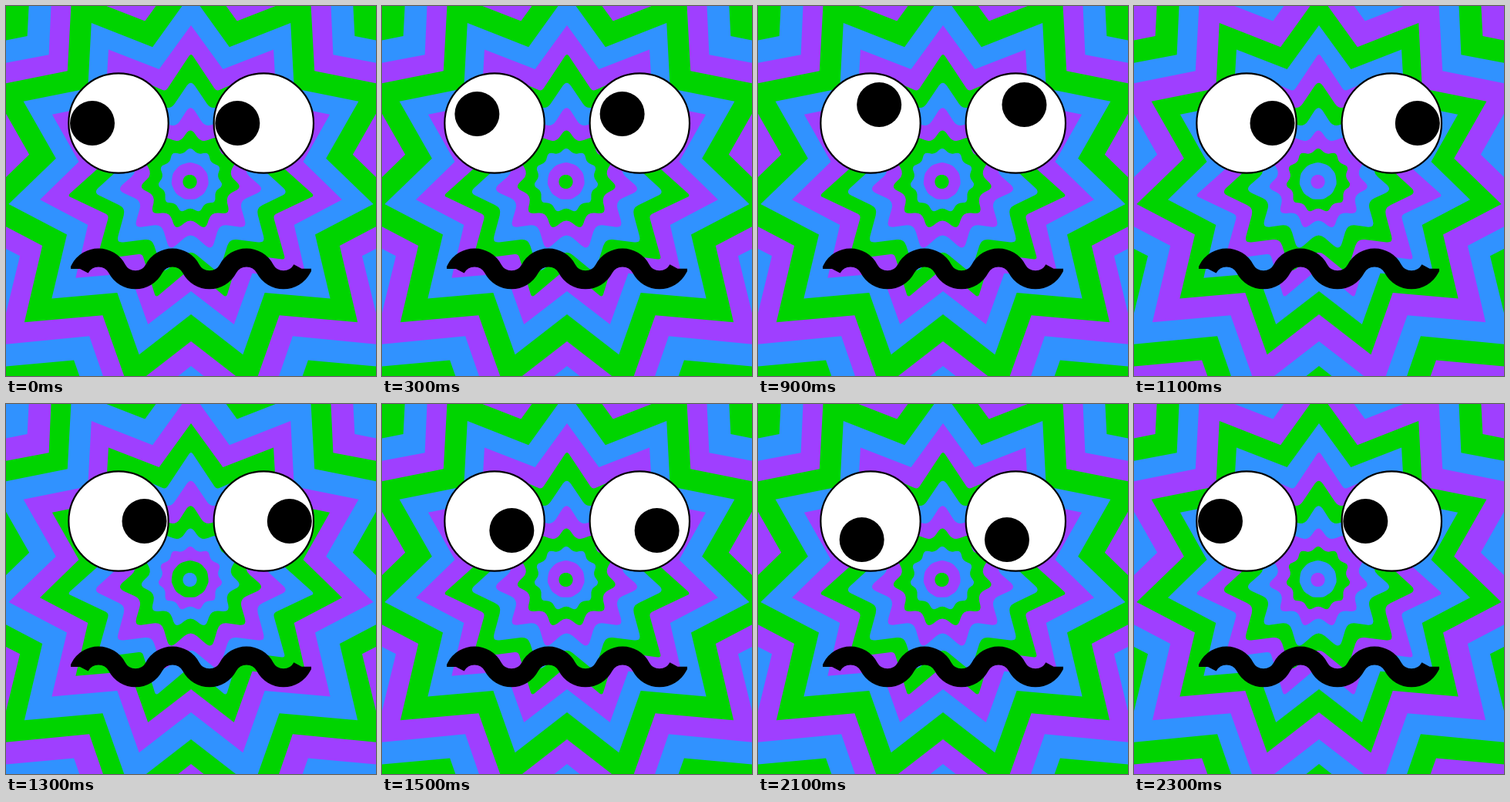
An HTML page with a canvas for the animation above (2.4 s loop, 480 by 480 pixels).

```html
<!DOCTYPE html>
<html lang="en">
<head>
<meta charset="utf-8">
<title>Dizzy face</title>
<style>
  html, body { margin: 0; width: 100%; height: 100%; overflow: hidden; }
  canvas { display: block; }
</style>
</head>
<body>
<canvas id="stage" width="480" height="480"></canvas>
<script>
const ctx = document.getElementById('stage').getContext('2d');
const STEP = 100, STEPS = 24, POINTS = 11;
const COLORS = ['#00d400', '#9f3fff', '#3092ff'];

// Each ring: tip radius, notch radius, corner rounding (0.5 = fully smooth)
const RINGS = [
  [9.2, 9.2, .5], [24.6, 23.6, .5], [44.3, 34.5, .5], [68, 50, .4],
  [97, 69.4, .3], [128, 93, .2], [162, 117, .08], [198, 147, 0],
  [239, 177, 0], [286, 212, 0], [331, 244, 0], [380, 281, 0]
].map(star);

const ARCS = [1, 0, 1, 0, 1, 0].map(sweep => `a27.2 27.2 0 0 ${sweep} 48 0`).join('');
const MOUTH = new Path2D(`M96 341v-.1${ARCS}v-.1`);

// Pupil stops, relative to the eye centre: left, top, right, bottom
const STOPS = [[-34, 0], [0, -36], [33.5, 0], [0, 36]];

function star([tip, notch, round], k) {
  const cx = Math.min(240, 238.5 + k * .25);
  const cy = Math.max(223, 228 - k * .85);
  const count = POINTS * 2;
  const corner = i => {
    const a = i * Math.PI / POINTS, r = i % 2 ? notch : tip;
    return [cx + r * Math.sin(a), cy - r * Math.cos(a)];
  };
  const path = new Path2D();
  for (let i = 0; i < count; i++) {
    const p = corner(i);
    path.lineTo(...mix(p, corner(i + count - 1), round));
    path.quadraticCurveTo(...p, ...mix(p, corner(i + 1), round));
  }
  path.closePath();
  return path;
}

function mix(a, b, t) {
  return a.map((v, i) => v + (b[i] - v) * t);
}

function disc(x, y, r, color) {
  ctx.beginPath();
  ctx.arc(x, y, r, 0, Math.PI * 2);
  ctx.fillStyle = color;
  ctx.fill();
}

function drawRings(n) {
  const color = k => COLORS[(k + STEPS - n) % 3];
  ctx.fillStyle = color(RINGS.length);
  ctx.fillRect(0, 0, 480, 480);
  for (let k = RINGS.length - 1; k >= 0; k--) {
    ctx.fillStyle = color(k);
    ctx.fill(RINGS[k]);
  }
}

function drawEyes(n) {
  // Rest at a stop for three steps, then glide to the next in three
  const phase = (n + 1) % STEPS;
  const leg = Math.floor(phase / 6);
  const [dx, dy] = mix(STOPS[leg], STOPS[(leg + 1) % 4], Math.max(0, phase % 6 - 3) / 3);
  ctx.lineWidth = 2.2;
  for (const x of [146, 334.3]) {
    disc(x, 152, 64.7, '#fff');
    ctx.stroke();
    disc(x + dx, 152 + dy, 29, '#000');
  }
}

function frame() {
  const n = Math.floor(performance.now() / STEP) % STEPS;
  drawRings(n);
  ctx.strokeStyle = '#000';
  drawEyes(n);
  ctx.lineWidth = 24;
  ctx.stroke(MOUTH);
  requestAnimationFrame(frame);
}
frame();
</script>
</body>
</html>
```
